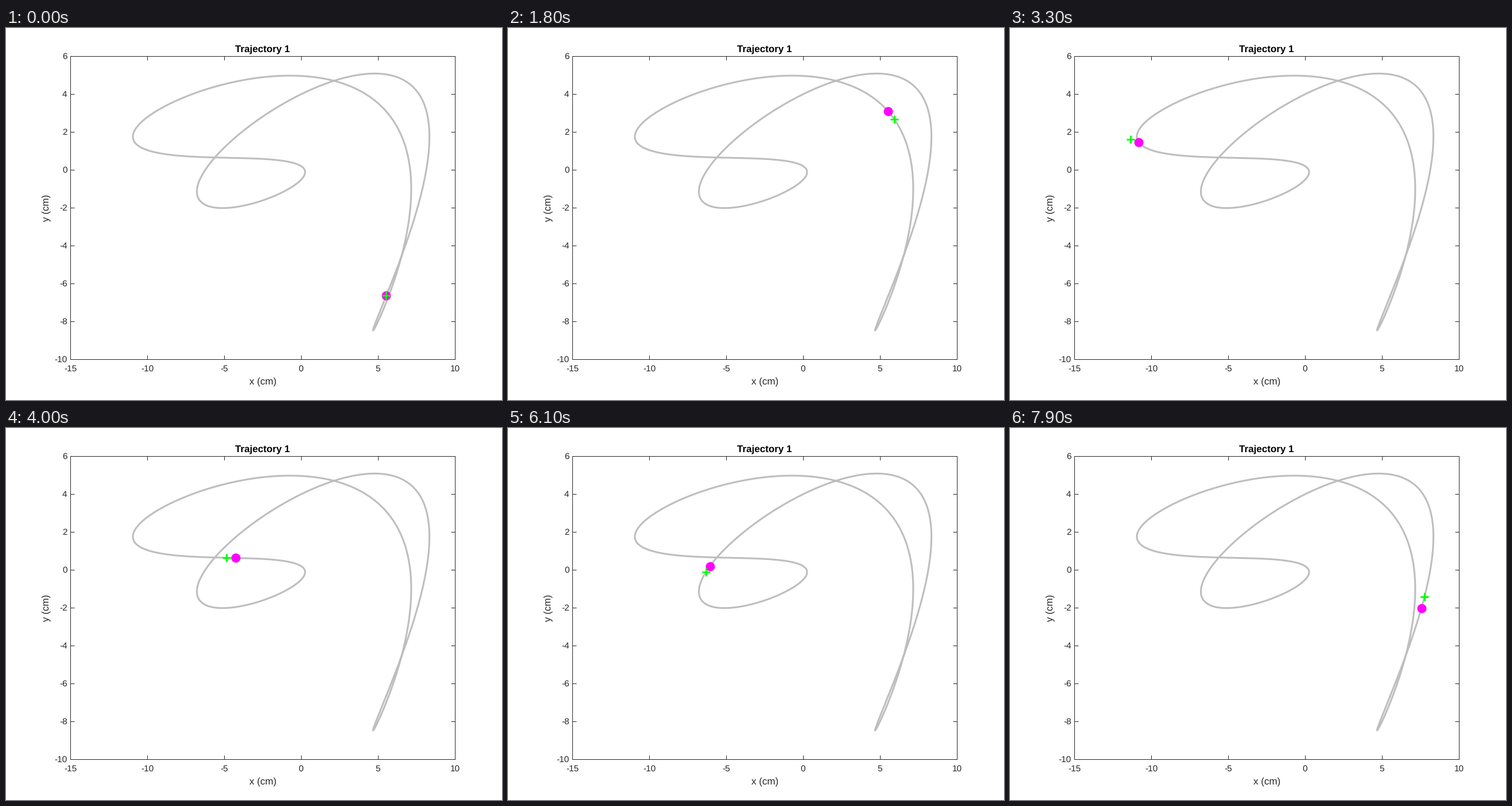
A matplotlib script that plays this animation: 864x648 px, repeating every 8000 ms.

```python
import numpy as np
import matplotlib.pyplot as plt
from matplotlib.animation import FuncAnimation

W, H, DPI = 864, 648, 100
PX = 72 / DPI                     # points per pixel
INK = (0.15, 0.15, 0.15)
BOX = (0.13, 0.11, 0.775, 0.815)

STEP = np.radians(4.385)          # phase advance per 0.1 s tick
LAG = 0.48                        # cross delay, in ticks
P, Q = 2.5, 2.5 * np.sqrt(3)      # path amplitudes, cm

# Moments when the cross strays: time, half-width (s), dx, dy (cm)
SLIPS = [(0.1, 0.1, 0.6, 0.21), (0.55, 0.35, -0.26, -0.3),
         (2.55, 0.25, -0.5, -0.47), (3.2, 0.35, -0.52, 0),
         (4.6, 0.3, 0.52, 0.36)]

plt.rcParams.update({"font.family": "Liberation Sans", "text.hinting": "none",
                     "axes.unicode_minus": False})


def path(a):
    """Closed curve built from the first three harmonics."""
    c1 = np.cos(a)
    c2 = np.cos(2 * a - np.pi / 4)
    c3 = np.cos(3 * a - np.pi / 4)
    return np.array([(P + Q) * c1 + P * c2 - Q * c3,
                     (P - Q) * c1 - Q * c2 - P * c3])


def slip(t):
    """Sum of smooth bumps around the slip moments."""
    total = np.zeros(2)
    for t0, w, dx, dy in SLIPS:
        u = min(abs(t - t0) / w, 1)
        total += np.cos(np.pi / 2 * u) ** 2 * np.array([dx, dy])
    return total


fig = plt.figure(figsize=(W / DPI, H / DPI), dpi=DPI, facecolor="white")
ax = fig.add_axes(BOX, xlim=(-15, 10), ylim=(-10, 6))
xticks, yticks = range(-15, 11, 5), range(-10, 7, 2)
ax.set_xticks(xticks)
ax.set_yticks(yticks)
ax.tick_params(direction="in", length=6.7 * PX, width=PX, color=INK, top=True,
               right=True, labelbottom=False, labelleft=False)
for s in ax.spines.values():
    s.set(linewidth=PX, edgecolor=INK)


def label(x, y, text, size, **kw):
    opts = dict(ha="center", va="baseline", color=INK, rotation_mode="anchor")
    fig.text(x / W, 1 - y / H, text, fontsize=size * PX, **(opts | kw))


TICK, LABEL = 15.43, 16.97
for v in xticks:
    label(W * (BOX[0] + BOX[2] * (v + 15) / 25), 598.2, str(v), TICK)
for v in yticks:
    label(106.5, H * (1 - BOX[1] - BOX[3] * (v + 10) / 16) + 5.3, str(v), TICK,
          ha="right")
label(447.1, 620, "x (cm)", LABEL)
label(74, 313, "y (cm)", LABEL, rotation=90)
label(447.1, 41.8, "Trajectory 1", LABEL, weight="bold", color="black")

ax.plot(*path(np.linspace(0, 2 * np.pi, 800)), color="0.745", lw=3.09 * PX,
        solid_joinstyle="round")
disc, = ax.plot([], [], "o", color="magenta", ms=16 * PX, mew=0)
cross, = ax.plot([], [], "+", color="lime", ms=14 * PX, mew=3 * PX)


def update(i):
    # the disc rests for one tick before it sets off
    tick = max(i - 1, 0)
    x, y = path(STEP * tick)
    disc.set_data([x], [y])
    x, y = path(STEP * max(tick - LAG, 0)) + slip(i / 10)
    cross.set_data([x], [y])
    return disc, cross


anim = FuncAnimation(fig, update, frames=80, interval=100, repeat=True,
                     repeat_delay=0)
plt.show()
```
